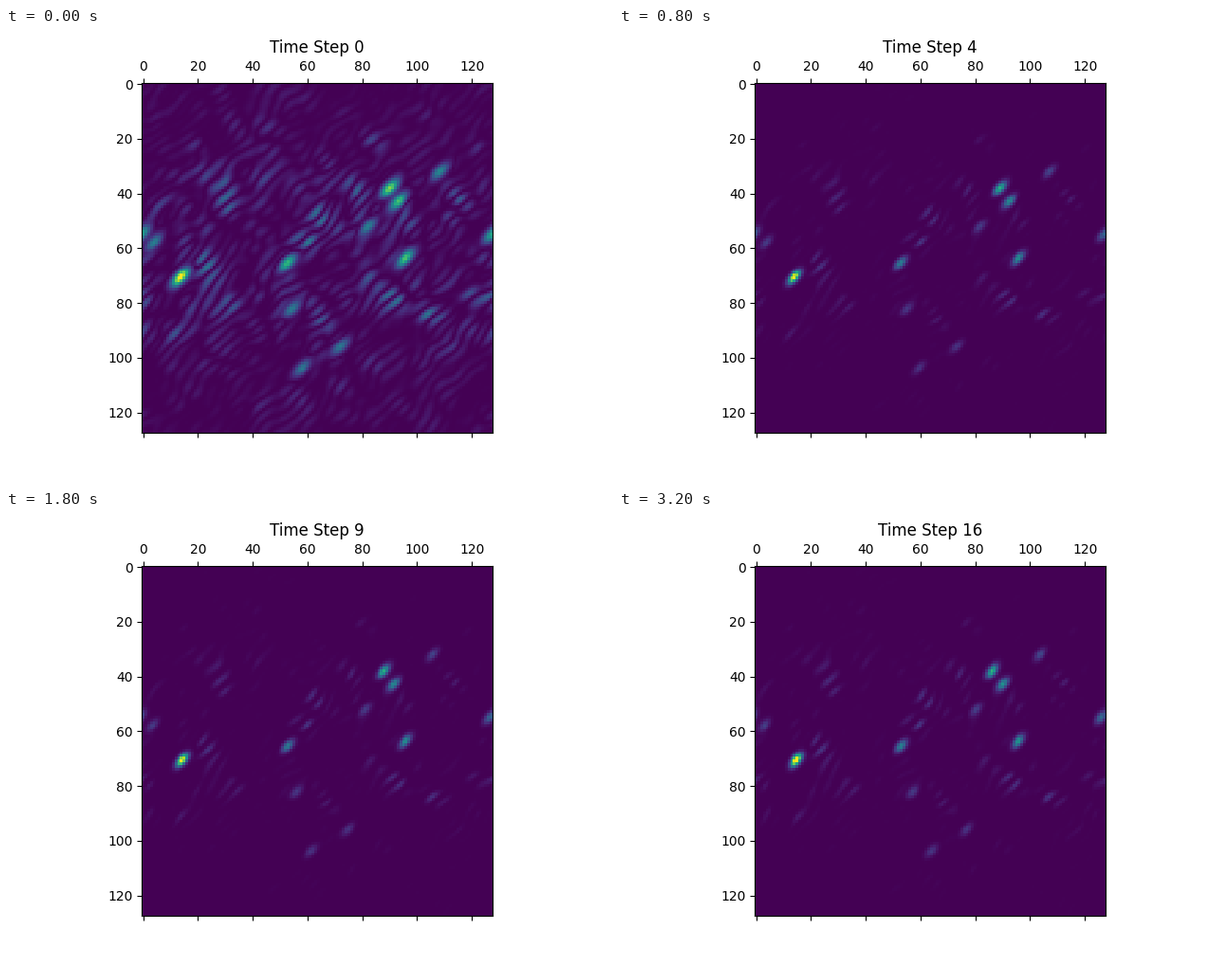
These frames come from a looping animation (640 px wide and 480 px high, 3.4 s). A matplotlib script:

```python
import matplotlib.pyplot as plt
import numpy as np
from matplotlib.animation import FuncAnimation

SIZE = 128
STEPS = 17
SHEAR = 0.0094  # columns per step for each row away from the middle
TILT = np.radians(45)

# x, y, amplitude of the brightest wave packets
PACKETS = [
    (13.7, 70.7, 1), (90, 38.2, .78), (93.2, 43, .68), (95.7, 63.8, .7),
    (52.7, 65.5, .64), (127.3, 55, .56), (108.3, 32.2, .45), (82, 52.3, .42),
    (4, 58, .42), (54.3, 82.3, .4), (72, 96, .38), (58, 103.8, .38),
]

rows, cols = np.mgrid[:SIZE, :SIZE]


def rotate(x, y):
    """Components along and across the tilted crests (y points down)."""
    c, s = np.cos(TILT), np.sin(TILT)
    return x * c - y * s, x * s + y * c


def packet(x, y, amp, length=2.9, width=1.35):
    dx = (cols - x + SIZE / 2) % SIZE - SIZE / 2
    along, across = rotate(dx, rows - y)
    return amp * np.exp(-((along / length) ** 2 + (across / width) ** 2) / 2)


def ripples(length=3, wave=0.75, spread=0.3, contrast=1.7):
    """Seeded noise, band-passed into tilted crests with sparse bright spots."""
    k = 2 * np.pi * np.fft.fftfreq(SIZE)
    along, across = rotate(k[None, :], k[:, None])
    band = np.exp(-((along * length) ** 2
                    + ((np.abs(across) - wave) / spread) ** 2) / 2)
    white = np.random.default_rng(11).normal(size=(SIZE, SIZE))
    noise = np.fft.ifft2(np.fft.fft2(white) * band).real
    noise /= noise.std()
    return np.sign(noise) * np.abs(noise) ** contrast


def make_field():
    bright = sum(packet(*p) for p in PACKETS)
    envelope = 0.01 + 0.042 * np.exp(-((rows - 62) / 29) ** 2 / 2)
    return bright + envelope * ripples() * np.exp(-8 * bright)


spectrum = np.fft.fft(make_field(), axis=1)
wavenumber = 2 * np.pi * np.fft.fftfreq(SIZE)


def sheared(step):
    shift = SHEAR * step * (np.arange(SIZE) - SIZE / 2)
    phase = np.exp(-1j * wavenumber * shift[:, None])
    return np.abs(np.fft.ifft(spectrum * phase, axis=1).real)


fig, ax = plt.subplots(figsize=(6.4, 4.8), dpi=100)
image = ax.matshow(np.zeros((SIZE, SIZE)), cmap="viridis", vmin=0, vmax=1)


def update(step):
    values = sheared(step)
    values /= values.max()
    # The first step shows amplitude, the rest show intensity.
    image.set_data(values if step == 0 else values ** 2)
    title = ax.set_title(f"Time Step {step}")
    return image, title


animation = FuncAnimation(fig, update, frames=STEPS, interval=200,
                          repeat=True, repeat_delay=0)
plt.show()
```
